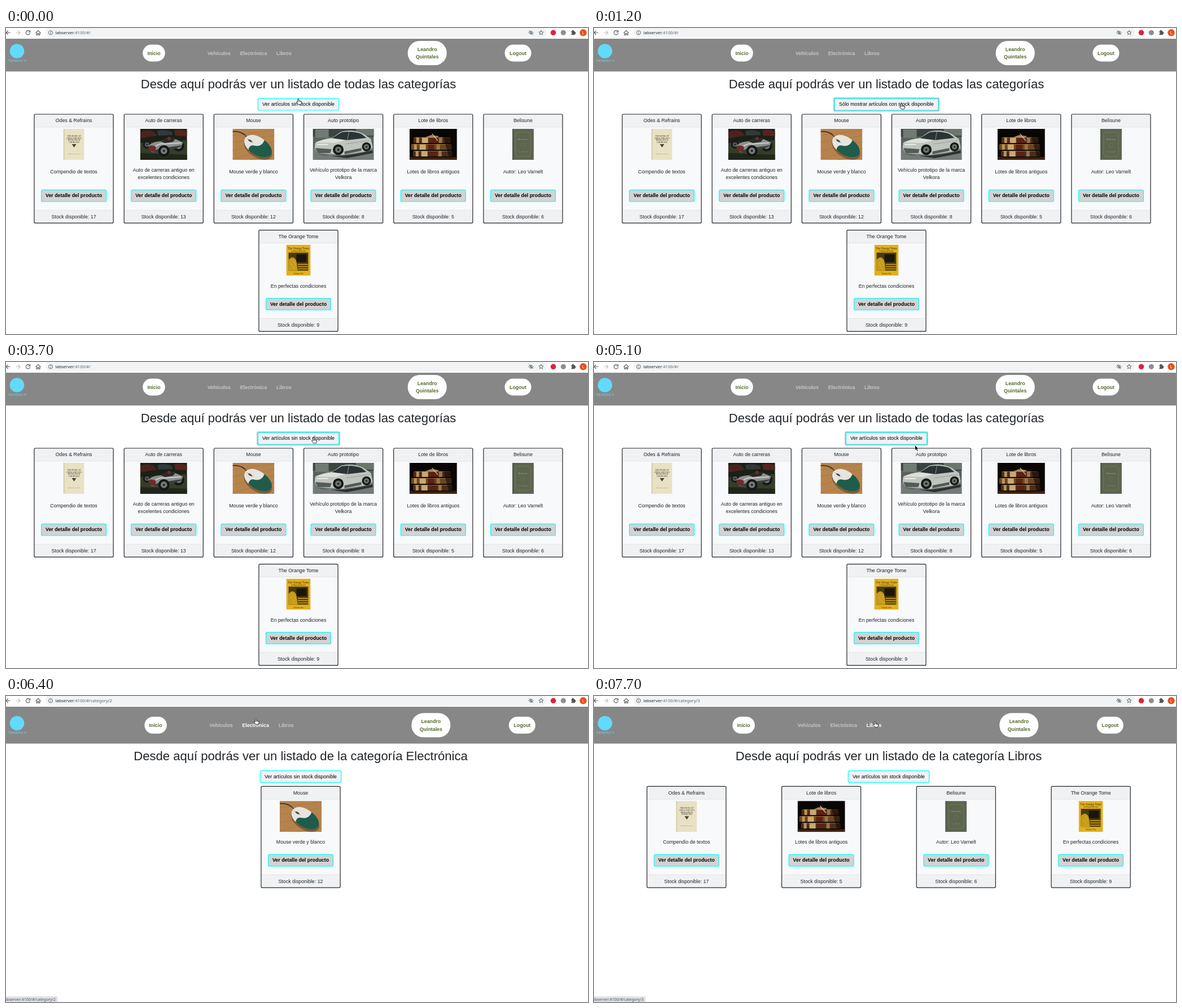
An HTML page for the animation above (8000 ms loop, 1031 by 543 pixels).

```html
<!DOCTYPE html>
<html lang="es">
<head>
<meta charset="utf-8">
<style>
html, body { margin: 0; width: 100%; height: 100%; overflow: hidden; background: #fff; }
svg { display: block; }
#stage { width: 1031px; height: 543px; font: 8.83px "Liberation Sans", Arial, sans-serif; }
text { text-anchor: middle; fill: #212529; white-space: pre; }
.b { font-weight: bold; }
.l { text-anchor: start; }
.e { text-anchor: end; }
.ui { font-family: "Noto Sans", sans-serif; }
</style>
</head>
<body>
<svg id="stage" viewBox="0 0 1031 543"><g id="page"></g><g id="cursor"></g></svg>
<script>
const rect = (x, y, w, h, fill, more = '') => `<rect x="${x}" y="${y}" width="${w}" height="${h}" fill="${fill}" ${more}/>`;
const oval = (x, y, rx, ry, fill, more = '') => `<ellipse cx="${x}" cy="${y}" rx="${rx}" ry="${ry}" fill="${fill}" ${more}/>`;
const disc = (x, y, r, fill, more) => oval(x, y, r, r, fill, more);
const path = (d, fill, more = '') => `<path d="${d}" fill="${fill}" ${more}/>`;
const line = (d, color, width = 1) => path(d, 'none', `stroke="${color}" stroke-width="${width}"`);
const text = (s, x, y, more = '') => `<text x="${x}" y="${y}" ${more}>${s}</text>`;
const bold = (s, x, y, fill) => text(s, x, y, `class="b" style="fill:${fill}"`);
const tiny = (s, x, y, size, fill) => text(s, x, y, `style="font:${size}px 'Liberation Serif',serif;fill:${fill}"`);
const wheel = (x, y, r, rim = '#777') => disc(x, y, r, '#161716') + disc(x, y, r * .58, rim) + disc(x, y, r * .2, '#222');
const spoked = (x, y, r) => disc(x, y, r, '#8b8a83', 'stroke="#222" stroke-width="2.2"') + disc(x, y, 3, '#333');

// Product pictures, 55 high
const art = {
  odes: () => rect(0, 0, 37, 55, '#e8e1c3') + rect(0, 0, 2, 55, '#d5cba6') +
    ['THE BOOK OF', 'ODES AND OLD', 'REFRAINS &amp;', 'CHORUSES'].map((s, i) => tiny(s, 19, 14 + i * 3.7, 3.7, '#3b362a')).join('') +
    path('M15 27h8l-4 6z', '#4a4435') + tiny('PRINTED IN TOWN', 19, 45, 2.5, '#6b634b'),
  racer: () => rect(0, 0, 83, 55, '#1b2016') + path('M0 25L83 20V55H0z', '#343d29') + path('M0 43L83 46v9H0z', '#20271a') +
    path('M0 5Q12 0 24 5L30 12 0 17z', '#4c2220') + path('M30 4Q44 0 57 6V11L32 12z', '#33383a') + path('M60 3Q74 0 83 5V13L62 12z', '#57241f') +
    wheel(12, 28, 7, '#55575a') + wheel(68, 30, 10, '#777a78') + path('M14 31Q20 23 36 22L50 16 62 18 76 24 73 31 56 36 33 43 20 41z', '#8d908d') +
    path('M20 40L34 35 74 29 73 31 56 37 33 44z', '#3b3e3a') + path('M36 22L50 16 62 18 58 23 44 25z', '#2a2725') + disc(51, 17, 3, '#722925') +
    path('M14 31Q21 28 28 32L27 40 19 40z', '#6f2b29') + line('M27 31Q35 25 43 27L72 25', '#d3d5d2', 1.6) + wheel(42, 39, 10, '#777a76'),
  mouse: () => rect(0, 0, 74, 55, '#b7834d') + line('M0 12L74 2M0 24L74 12M0 39L74 23M0 53L74 35M30 55L74 47', '#ae7a45', 1.2) +
    line('M0 5Q17 3 26 16', '#3c362f', 1.8) + oval(45, 35, 28, 16, '#4b3a25', 'opacity=".5" transform="rotate(32 45 35)"') +
    '<g transform="rotate(32 45 31)">' + oval(45, 31, 27, 15.5, '#1f5c4b') + path('M49 15.8C28 13 18 23 18 31 18 38 26 44 34 45Q30 36 40 33 51 29 49 15.8z', '#e5e4df') +
    line('M20 30L35 30', '#aaa69b', .8) + oval(28, 30, 4, 1.6, '#504d48') + '</g>',
  proto: () => rect(0, 0, 108, 55, '#59625e') + rect(0, 0, 108, 14, '#3b4441') + rect(4, 1, 24, 15, '#707b74') + rect(76, 0, 32, 12, '#6b766f') +
    path('M0 36L108 33V55H0z', '#747a78') + path('M6 44Q45 54 106 38V43L60 52z', '#2d3231') +
    path('M4 25Q16 18 34 16L50 5Q71 0 90 9L103 18 106 33 99 39 53 46 9 43 3 35z', '#bfc5be') +
    path('M34 16.5L51 6Q70 3 86 9L95 16 61 20z', '#2b3435') + line('M64 5L61 20', '#8b938e') +
    path('M4 24Q18 19 34 17L57 20 40 25z', '#dde1db') + path('M4 34L33 36 31 43 9 43z', '#535c58') + path('M56 40L86 34 86 39 56 45z', '#525b57') +
    rect(7, 27, 20, 1.6, '#f1f4f0') + line('M58 27L101 21', '#929a94', .9) + wheel(45, 37, 9.5, '#6c7370') + wheel(95, 32, 8, '#6c7370'),
  lot: () => rect(0, 0, 84, 55, '#0a0604') + rect(0, 50, 84, 5, '#3d2413') +
    [[7, 15, 66], [3, 27, 72], [6, 39, 70]].map(([x, y, w], i) => rect(x, y, w, 10.5, i == 1 ? '#6b4523' : '#4e2c17', 'rx="2"') +
      rect(x + 5, y, 5, 10.5, '#b8955c') + rect(x + 15, y, 11, 10.5, '#c9a871') + rect(x + 30, y, 11, 10.5, '#5e2013') + rect(x + 45, y, 6, 10.5, '#9b7541') +
      line(`M${x + 2} ${y + .6}h${w - 4}`, '#a87942', .8) + line(`M${x} ${y + 10.8}h${w}`, '#0a0604', 1.6)).join('') +
    path('M28 15L38 11 52 13 49 16z', '#a98755') + line('M40 9L50 21', '#d8c393', 1.4) + path('M56 0H84V50H70z', '#0a0604', 'opacity=".55"'),
  green: () => rect(0, 0, 38, 55, '#5c6550') + rect(0, 0, 2, 55, '#4c5543') +
    rect(6, 6, 26, 43, 'none', 'rx="4" stroke="#857f55" stroke-width=".7"') + tiny('Belisune', 19, 20, 5, '#aaa060') +
    disc(19, 29, 4, 'none', 'stroke="#7b7650" stroke-width=".6"') + tiny('Leo Varnelt', 19, 42, 3.5, '#968e59'),
  amber: () => rect(0, 0, 43, 55, '#e3b01c') + tiny('The Orange Tome', 21.5, 8, 5.2, '#3b2d0b') + tiny('An Illustrated Review', 21.5, 12, 3, '#3b2d0b') +
    rect(4, 14, 35, 32, '#4a3a0f') + path('M4 27Q12 17 18 29L20 46H4z', '#c69a1b') + path('M18 17H36V31H18z', '#1b160a') +
    line('M20 35H39M20 39H39M20 43H39M7 32L16 44M11 27L18 38', '#d6a91e', 1.5) + tiny('Volume One', 21.5, 52, 3.6, '#3b2d0b'),
  moto: () => rect(0, 0, 88, 55, '#a09d93') + rect(0, 0, 88, 23, '#777970') + rect(0, 0, 29, 17, '#b5b7af') + rect(61, 0, 27, 20, '#68675c') +
    rect(0, 43, 88, 12, '#b4ada0') + oval(44, 49, 37, 4, '#817b70') + spoked(18, 38, 11) + spoked(70, 37, 11) +
    path('M8 28Q18 17 33 31L29 34Q17 25 8 32z', '#2e302f') + path('M57 28Q72 19 83 31L80 34Q70 26 60 34z', '#2e302f') +
    path('M30 22Q43 12 54 21L48 30 34 29z', '#202422') + path('M50 21Q65 17 74 23L60 27z', '#3c2a22') +
    rect(34, 29, 23, 15, '#484b48', 'rx="3"') + disc(43, 36, 5, '#b6b7b1') + line('M29 11L18 38M29 11L22 7M34 29L48 43 70 37', '#333', 2) +
    line('M40 43L75 44', '#d0d0c8', 2.2) + disc(26, 17, 4, '#444') + path('M80 12h8v18h-6z', '#8c4a38'),
  retro: () => rect(0, 0, 74, 55, '#fff') + path('M12 5L46 3 49 30 15 32z', '#c6c0ae') + path('M46 3L52 7 53 28 49 30z', '#98917f') +
    path('M17 8L42 7 44 25 19 26z', '#3166a7') + path('M20 11L39 10 40 22 22 23z', '#608cc2') + path('M29 12L36 12 36 19 30 19z', '#dce5ed') +
    path('M10 32H55L62 45 5 47z', '#d0c9b6') + path('M5 47L62 45V49L5 51z', '#a59d89') +
    line('M13 38H50M12 41H50M10 44H51', '#8e8675', 1.7) + line('M14 34H52', '#aaa18d', 1.2) + line('M53 35L58 43', '#aaa18d', 2) +
    path('M62 39L70 38 72 44 64 46z', '#bdb6a4') + line('M56 32Q68 30 67 38', '#aaa18d', .8),
};
const item = (pic, w, name, stock, ...desc) => ({ pic, w, name, stock, desc });
const items = [
  item('odes', 37, 'Odes &amp; Refrains', 17, 'Compendio de textos'),
  item('racer', 83, 'Auto de carreras', 13, 'Auto de carreras antiguo en', 'excelentes condiciones'),
  item('moto', 88, 'Moto', 0, 'Una motocicleta para la ciudad'),
  item('retro', 74, 'Nubix 300', 0, 'Computadora Nubix 300'),
  item('mouse', 74, 'Mouse', 12, 'Mouse verde y blanco'),
  item('proto', 108, 'Auto prototipo', 8, 'Vehículo prototipo de la marca', 'Velkora'),
  item('lot', 84, 'Lote de libros', 5, 'Lotes de libros antiguos'),
  item('green', 38, 'Belisune', 6, 'Autor: Leo Varnelt'),
  item('amber', 43, 'The Orange Tome', 9, 'En perfectas condiciones'),
];
const books = ['odes', 'lot', 'green', 'amber'];

function button(x, y, w, label, fill, isBold) {
  return rect(x - w / 2 + .6, y + .6, w - 1.2, 20.6, fill, 'rx="2" stroke="#0ff" stroke-width="1.2"') +
    text(label, x, y + 13.6, `style="fill:#000" ${isBold ? 'class="b"' : ''}`);
}

function card(x, y, tall, it) {
  const d = tall ? 13.4 : 0, left = x - 70.65, h = 181 + d;
  const descY = it.desc.length > 1 ? 102.8 : tall ? 106 : 102.7;
  return rect(left + .6, y + .6, 140.1, h - 1.2, '#f8f9fb', 'rx="2"') +
    rect(left + 1, y + 1, 139.3, 22.5, '#f0f1f3') + rect(left + 1, y + 157.5 + d, 139.3, 22.5, '#f0f1f3') +
    line(`M${left + 1} ${y + 23.5}h139.3M${left + 1} ${y + 157.5 + d}h139.3`, '#d8d9db', .6) +
    rect(left + .6, y + .6, 140.1, h - 1.2, 'none', 'rx="2" stroke="#212529" stroke-width="1.2"') +
    text(it.name, x, y + 15) +
    `<svg x="${x - it.w / 2}" y="${y + 26.5}" width="${it.w}" height="55">${art[it.pic]()}</svg>` +
    it.desc.map((s, i) => text(s, x, y + descY + i * 13.25)).join('') +
    button(x, y + 121 + d, 116, 'Ver detalle del producto', '#d3d3d3', true) +
    text('Stock disponible: ' + it.stock, x, y + 171.8 + d);
}

function grid(list, mid, y) {
  const rows = [list.slice(0, 6), list.slice(6)];
  return rows.map((row, r) => row.map((it, i) =>
    card(mid + (i - (row.length - 1) / 2) * 955 / row.length, y + r * 205.6, list.length > 6 && !r, it)).join('')).join('');
}

function toolbar(route) {
  const grey = '#55595d', host = 'labserver';
  const star = [...Array(10)].map((_, i) => {
    const a = i * Math.PI / 5, r = i % 2 ? 1.9 : 4.3;
    return (948 + r * Math.sin(a)).toFixed(1) + ',' + (8.4 - r * Math.cos(a)).toFixed(1);
  }).join(' ');
  return rect(0, 0, 1031, 19, '#fff') + rect(70, -2, 888, 18.5, '#f1f3f4', 'rx="9"') +
    line('M7.5 8.3H0M3.7 4.6L0 8.3l3.7 3.7', grey, 1.1) + line('M17.5 8.3H25M21.3 4.6L25 8.3l-3.7 3.7', '#b9bcbf', 1.1) +
    line('M41.8 5.8A3.7 3.7 0 1 0 42.7 9M42.8 4v3.2h-3.2', grey, 1.1) + line('M52.5 8.7L57 4.5l4.5 4.2M54 8v4.5h2v-3h2v3h2V8', grey, 1.1) +
    disc(79, 8.3, 3.6, 'none', `stroke="${grey}" stroke-width=".9"`) + line('M79 7.8v2.5M79 6v1', grey, .9) +
    text(`${host}<tspan style="fill:#5f6368">:4100/#/${route}</tspan>`, 87.5, 11, 'class="l ui" font-size="7.5"') +
    line('M926 8.3q4-5.5 8 0q-4 5.5-8 0M926.5 4.5l7.2 7.5', grey) + disc(930, 8.3, 1.4, grey) +
    `<polygon points="${star}" fill="none" stroke="${grey}" stroke-width=".9"/>` +
    disc(969.5, 8.3, 4.8, '#e0213c') + disc(987.3, 8.3, 4.6, '#8c8e90') +
    rect(1001.3, 5.5, 6.6, 6.8, '#505458', 'rx="1"') + disc(1004.3, 5.1, 1.6, '#505458') + disc(1008, 8.8, 1.6, '#505458') + disc(1001.4, 9, 1.3, '#fff') +
    disc(1022.5, 8.3, 6.2, '#e8501c') + text('L', 1022.5, 10.9, 'class="ui" font-size="7" style="fill:#fff"');
}

function navbar(wide, dy, active, hover) {
  const pill = (x, w, h) => rect(x - w / 2, 44.5 + dy - h / 2, w, h, '#fff', `rx="${Math.min(h / 2, 21)}"`);
  const olive = '#556b2f', y = 47.6 + dy;
  const home = wide ? 265.1 : 262, user = wide ? 752.8 : 746.2, exit = wide ? 914.3 : 907;
  const links = [['Vehículos', 377.5], ['Electrónica', 438.5], ['Libros', 492.4]];
  return rect(0, 19, 1031, 58.2 + dy, '#878787') +
    disc(19.5, 41 + dy, 12.8, '#61dafb') + text('TIENDAS 4', 19.3, 60 + dy, 'font-size="6.2" style="fill:#61dafb"') +
    pill(home, 39.5, 30) + bold('Inicio', home, y, olive) +
    links.map(([s, x], i) => bold(s, x + (wide ? 3.6 : 0), y, i + 1 == active ? '#fff' : i + 1 == hover ? '#e3e3e3' : '#c6c6c6')).join('') +
    pill(user, 69, 43) + bold('Leandro', user, y - 6.6, olive) + bold('Quintales', user, y + 6.6, olive) +
    pill(exit, 47, 30) + bold('Logout', exit, y, olive);
}

function page(t) {
  const wide = t >= 6400, dy = wide ? 7.3 : 0, mid = wide ? 522 : 518;
  const cat = t < 6000 ? 0 : t < 7500 ? 2 : 3;
  const hover = t < 5700 ? 0 : t < 7100 ? 2 : 3;
  const showAll = t >= 1200 && t < 3700;
  const list = items.filter(it => t >= 7700 ? books.includes(it.pic) : wide ? it.pic == 'mouse' : it.stock || (t >= 1600 && t < 3700));
  const title = cat ? 'la categoría ' + ['Electrónica', 'Libros'][cat - 2] : 'todas las categorías';
  const w = showAll ? 185 : 144.5;
  const ring = t >= 1100 && t < 6000;
  const route = n => n ? 'category/' + n : '';
  return toolbar(route(cat)) + navbar(wide, dy, cat, hover) +
    text('Desde aquí podrás ver un listado de ' + title, mid, 106.7 + dy, 'font-size="22.08"') +
    (ring ? rect(mid - w / 2 - 1.6, 123.2 + dy, w + 3.2, 25, '#b9c0c6', 'rx="3"') : '') +
    button(mid, 124.8 + dy, w, showAll ? 'Sólo mostrar artículos con stock disponible' : 'Ver artículos sin stock disponible', '#f1f2f4') +
    grid(list, mid, 152.4 + dy) +
    (cat ? rect(-4, 533, 95.5, 14, '#dee1e6', 'rx="2.5"') + text('labserver:4100/#/' + route(hover), 88, 541, 'class="e ui" font-size="6.9" style="fill:#4d5156"') : '');
}

const pointers = {
  hand: path('M3 .8Q4.7.2 4.9 2V4.2Q6 3.5 6.6 4.6 7.9 4 8.3 5.1 9.6 4.8 9.6 6.3 9.7 8.7 8.3 10.5H3.7L.8 7Q.2 5.6 1.5 5.6L2.8 6.6V2Q2.5 1 3 .8z', '#fff', 'stroke="#222" stroke-width=".9"') +
    line('M4.9 4.2V6.5M6.6 4.6V6.5M8.3 5.1V6.8', '#222', .6),
  arrow: path('M.5.5V10L2.8 8 4.3 11.5 6 10.8 4.5 7.5H7.5z', '#111', 'stroke="#fff" stroke-width=".7"'),
  beam: line('M.3.5H2.2L2.7 1 3.2.5H5.1M.3 9.8H2.2L2.7 9.3 3.2 9.8H5.1M2.7 1V9.3', '#222', .9),
};
// Start time, pointer, left, top
const moves = [
  [0, 'hand', 514, 125], [400, 'hand', 517, 126], [500, 'hand', 525, 128], [600, 'hand', 536, 131],
  [700, 'hand', 545, 133], [800, 'hand', 543, 133.5], [900, 'hand', 541, 133.5],
  [4400, 'arrow', 65, 221], [4600, 'arrow', 388.5, 471], [4800, 'arrow', 610, 185], [4900, 'arrow', 643.5, 220],
  [5100, 'arrow', 568, 147], [5300, 'beam', 421, 101], [5500, 'arrow', 417, 63], [5700, 'hand', 438.7, 39.7],
  [6900, 'hand', 463, 42], [7100, 'hand', 494, 43], [7300, 'hand', 494, 44.7],
];

const pageEl = document.getElementById('page'), cursorEl = document.getElementById('cursor');
const pageTimes = [0, 1100, 1200, 1600, 3700, 5700, 6000, 6400, 7100, 7500, 7700];
let shown = -1;
function draw(now) {
  const t = now % 8000;
  const start = pageTimes.findLast(s => s <= t);
  if (start !== shown) pageEl.innerHTML = page(shown = start);
  const [, shape, x, y] = moves.findLast(m => m[0] <= t);
  cursorEl.setAttribute('transform', `translate(${x} ${y})`);
  if (cursorEl.dataset.shape !== shape) cursorEl.innerHTML = pointers[cursorEl.dataset.shape = shape];
}
const origin = performance.now();
function tick() {
  draw(performance.now() - origin);
  requestAnimationFrame(tick);
}
tick();
</script>
</body>
</html>
```
